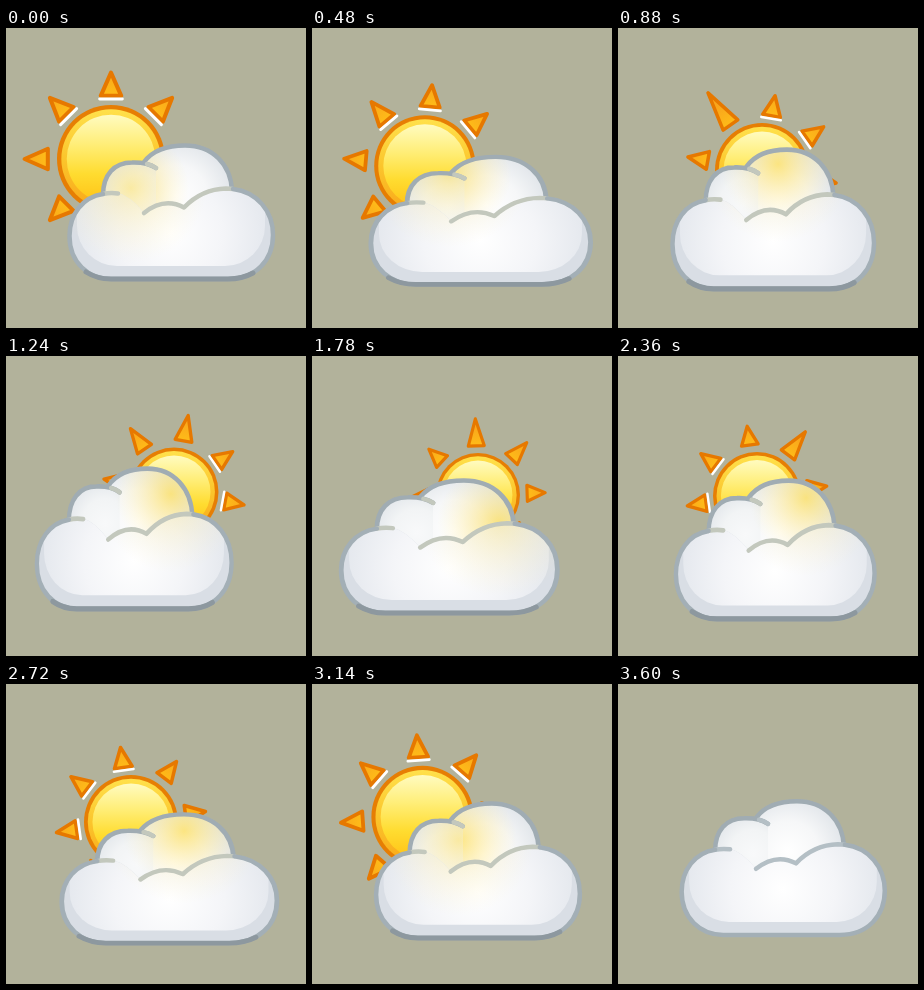
Recreate the animation shown at these times as an HTML page with a canvas. Size 300x300 px, loop 3620 ms.

```html
<!DOCTYPE html>
<html lang="en">
<head>
<meta charset="utf-8">
<title>Sun and cloud</title>
<style>
  html, body { margin: 0; width: 100%; height: 100%; overflow: hidden; background: #b2b29b; }
  canvas { display: block; }
</style>
</head>
<body>
<canvas id="stage" width="300" height="300"></canvas>
<script>
const ctx = document.getElementById('stage').getContext('2d');
const LOOP = 3620, STEP = 20, CLEAR_AT = 3600;

// Smooth periodic curve through values at the given times.
function track(times, values) {
  const n = times.length;
  const key = j => {
    const lap = Math.floor(j / n);
    return [times[j - lap * n] + lap * LOOP, values[j - lap * n]];
  };
  const slope = j => {
    const [t0, v0] = key(j - 1), [t1, v1] = key(j + 1);
    return (v1 - v0) / (t1 - t0);
  };
  return t => {
    const i = times.findLastIndex(k => k <= t);
    const [t0, v0] = key(i), [t1, v1] = key(i + 1);
    const d = t1 - t0, u = (t - t0) / d, s = u * u * (3 - 2 * u);
    return v0 + (v1 - v0) * s
      + d * u * (1 - u) * ((1 - u) * slope(i) - u * slope(i + 1));
  };
}
const tracks = (times, rows) =>
  Object.fromEntries(Object.entries(rows).map(([name, v]) => [name, track(times, v)]));

const sun = tracks([0, 560, 880, 1240, 1780, 2360, 2720, 3240], {
  x: [105, 116, 144, 168, 166, 139, 125, 108],
  y: [131, 139, 142, 136, 139, 140, 138, 132],
  r: [54, 50, 47, 44.5, 42, 44, 47, 52],
  turn: [0, 6, 10, 10.5, -2, -8, -8, -3],
  glowX: [125, 140, 160, 165, 187, 188, 178, 140],
  glowY: [160, 145, 136, 138, 166, 142, 147, 158]
});
const cloud = tracks([0, 540, 880, 1086, 1240, 1629, 1780, 2172, 2360, 2715, 3240], {
  x: [165, 168, 155, 140, 128, 129, 137, 153, 157, 163, 166],
  w: [209, 226, 207, 198, 200, 226, 222, 200, 204, 221, 207],
  h: [139, 133, 145, 149, 146, 134, 138, 146, 144, 134, 141],
  bottom: [254, 260, 264, 261, 256, 257, 260, 267, 266, 262, 256]
});

// Each ray: angle, optional stretch time, optional start and duration of its white base.
const rays = [
  { angle: 0, stretch: 1540, white: [2600, 2100] },
  { angle: 45, stretch: 2130, white: [3000, 1900] },
  { angle: 90, white: [1050, 500] },
  { angle: 135 }, { angle: 180 }, { angle: 225 },
  { angle: 270, white: [2200, 700] },
  { angle: 315, stretch: 920, white: [2250, 1870] }
];

const shapes = {
  dome: new Path2D('M133 144C140 126 157 117.5 179 117.5C207 117.5 225 137 226 163V205H133Z'),
  domeEdge: new Path2D('M138 134C147 122 161 117.5 179 117.5C207 117.5 225 137 226 163'),
  bump: new Path2D('M97 167C97 147 108 134.5 126 134.5Q141 134 150 140V205H97Z'),
  bumpEdge: new Path2D('M97 167C97 147 108 134.5 126 134.5Q141 134 150 140'),
  body: new Path2D('M112 165C84 163 63.5 182 63.5 208C63.5 234 82 251 105 251H222C250 251 267 232 267 207C267 180 248 160.5 220 160.5Q196 161 178 180Q158 168 138 185Q124 168 112 165Z'),
  bodyEdge: new Path2D('M97 166C77 169 63.5 186 63.5 208C63.5 234 82 251 105 251H222C250 251 267 232 267 207C267 183 251 164 227 161'),
  crease: new Path2D('M138 185Q158 169 178 179.5Q196 161 220 160.5L227 161M97 166Q104 164.5 112 165.5M141 136Q146 137 150 140'),
  base: new Path2D('M80 244Q91 251 105 251H222Q236 251 247 245')
};

function radial(x, y, radius, ...colors) {
  const g = ctx.createRadialGradient(x, y, 0, x, y, radius);
  colors.forEach((c, i) => g.addColorStop(i / (colors.length - 1), c));
  return g;
}
function vertical(y0, y1, ...colors) {
  const g = ctx.createLinearGradient(0, y0, 0, y1);
  colors.forEach((c, i) => g.addColorStop(i / (colors.length - 1), c));
  return g;
}
function line(path, color, width) {
  ctx.strokeStyle = color;
  ctx.lineWidth = width;
  ctx.stroke(path);
}
function disc(radius, fill) {
  ctx.beginPath();
  ctx.arc(0, 0, radius, 0, 2 * Math.PI);
  ctx.fillStyle = fill;
  ctx.fill();
}

function drawRay({ angle, stretch, white }, t) {
  ctx.save();
  ctx.rotate(angle * Math.PI / 180);
  const extra = stretch ? 0.41 * Math.exp(-(((t - stretch) / 210) ** 2) / 2) : 0;
  const ray = new Path2D(`M0 ${-1.6 - extra}L.19 -1.17H-.19Z`);
  ctx.fillStyle = vertical(-1.65, -1.1, '#f9a51c', '#ffbf18');
  ctx.fill(ray);
  line(ray, '#e67800', 0.075);
  if (white && (t - white[0] + LOOP) % LOOP < white[1])
    line(new Path2D('M-.21 -1.11H.21'), '#fff', 0.055);
  ctx.restore();
}

function drawSun(t) {
  const r = sun.r(t);
  ctx.save();
  ctx.translate(sun.x(t), sun.y(t));
  ctx.scale(r, r);
  ctx.save();
  ctx.rotate(sun.turn(t) * Math.PI / 180);
  rays.forEach(ray => drawRay(ray, t));
  ctx.restore();
  disc(1, '#e67e04');
  disc(0.92, vertical(-0.9, 0.9, '#ffe04a', '#fbc52c', '#f9a91a'));
  disc(0.82, vertical(-0.82, 0.82, '#fffbc0', '#ffee78', '#ffdc30', '#ffc216'));
  ctx.restore();
}

function drawCloud(t, lit) {
  const sx = cloud.w(t) / 209, sy = cloud.h(t) / 139;
  const left = cloud.x(t), bottom = cloud.bottom(t);
  const gx = (sun.glowX(t) - left) / sx + 165, gy = (sun.glowY(t) - bottom) / sy + 254;
  const glow = (path, alpha, radius) => {
    if (!lit) return;
    ctx.fillStyle = radial(gx, gy, radius, `rgba(255,222,80,${alpha})`,
      `rgba(255,228,120,${alpha * 0.5})`, 'rgba(255,235,160,0)');
    ctx.fill(path);
  };
  ctx.save();
  ctx.translate(left, bottom);
  ctx.scale(sx, sy);
  ctx.translate(-165, -254);

  ctx.fillStyle = radial(170, 168, 62, '#fff', '#f6f7f8', '#dde2e7');
  ctx.fill(shapes.dome);
  glow(shapes.dome, 0.7, 58);
  line(shapes.domeEdge, '#a0acb3', 4.5);
  ctx.fillStyle = radial(135, 170, 48, '#f8f9fa', '#f2f4f5', '#dde2e7');
  ctx.fill(shapes.bump);
  glow(shapes.bump, 0.5, 58);
  line(shapes.bumpEdge, '#a0acb3', 4.5);

  ctx.fillStyle = '#d9dee5';
  ctx.fill(shapes.body);
  ctx.save();
  ctx.clip(shapes.body);
  ctx.beginPath();
  ctx.roundRect(71, 130, 188, 108, 40);
  ctx.fillStyle = radial(165, 205, 105, '#fff', '#f4f5f8', '#e2e6ec');
  ctx.fill();
  ctx.restore();
  glow(shapes.body, 0.34, 75);
  line(shapes.crease, lit ? '#c3c8bd' : '#b4bfc5', 4.5);
  line(shapes.bodyEdge, '#a3afb6', 4.5);
  if (lit) line(shapes.base, '#8d989f', 5);
  ctx.restore();
}

function frame() {
  const t = Math.floor(performance.now() % LOOP / STEP) * STEP;
  const lit = t < CLEAR_AT;
  ctx.fillStyle = '#b2b29b';
  ctx.fillRect(0, 0, 300, 300);
  ctx.lineCap = ctx.lineJoin = 'round';
  if (lit) drawSun(t);
  drawCloud(t, lit);
  requestAnimationFrame(frame);
}
frame();
</script>
</body>
</html>
```
